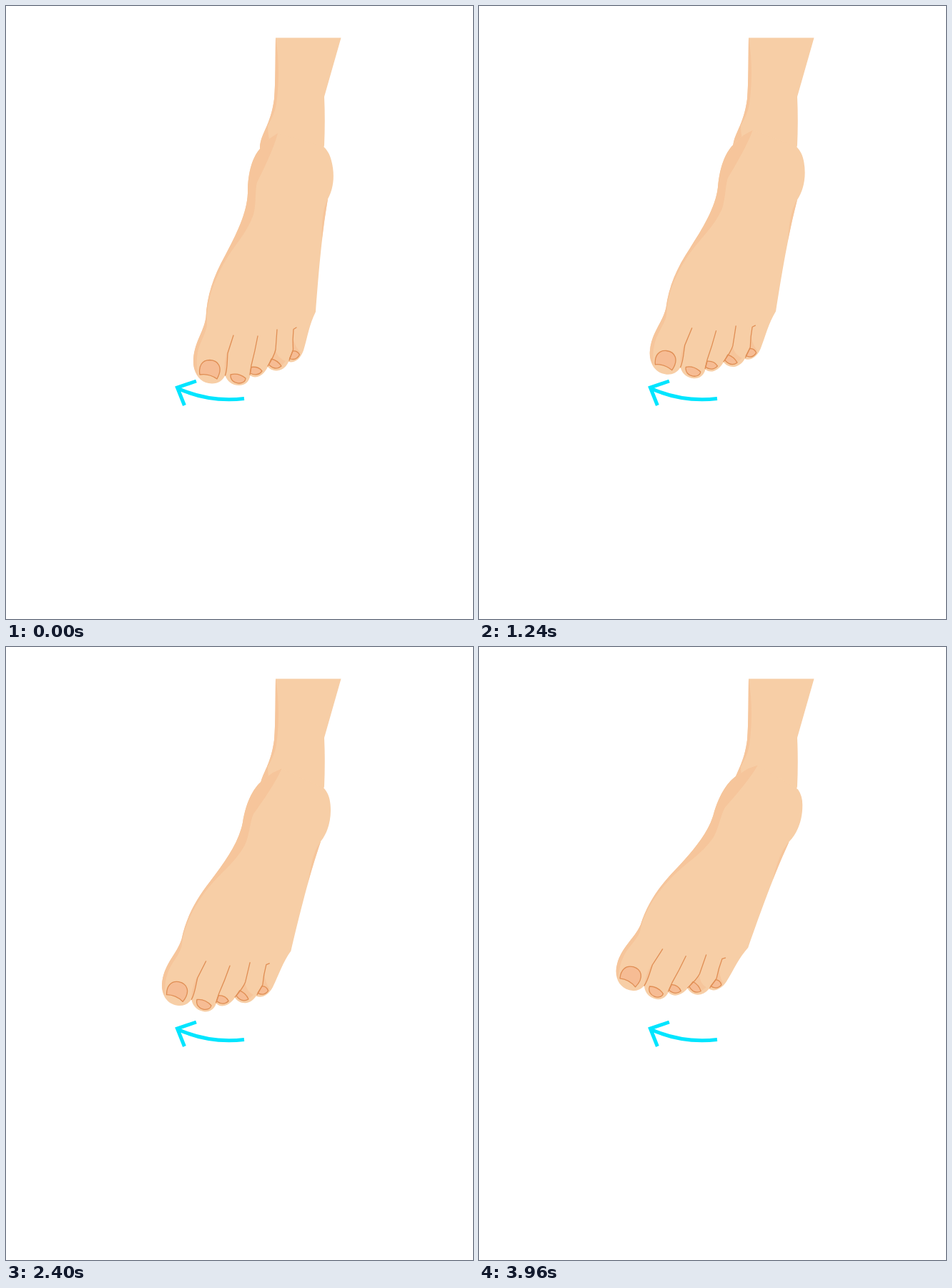
Animation of 653x858 px, one loop 4 s. Source, as an HTML page:

```html
<!DOCTYPE html>
<html lang="en">
<head>
<meta charset="utf-8">
<title>Foot rotation</title>
<style>
  html, body { margin: 0; width: 100%; height: 100%; overflow: hidden; background: #fff; }
  svg { display: block; width: 100%; height: 100%; }
  .skin { fill: #f7cea6; }
  .shade { fill: #f6c59b; }
  .line { fill: none; stroke: #e08e54; stroke-width: 1.3; stroke-linecap: round; stroke-linejoin: round; }
  .nail { fill: #f6bc94; stroke: #e08e54; stroke-width: 1.3; stroke-linejoin: round; }
  .arrow { fill: none; stroke: #00e5ff; stroke-width: 5; }
</style>
</head>
<body>
<svg viewBox="0 0 653 858">
  <g id="leg">
    <path class="skin" d="M377 44.5H468.5L445 127Q446.5 160 445 195L440 215H355V198C356 178 370 168 375 130C377 105 376.5 75 377 44.5Z"/>
    <path class="shade" d="M377 44.5C381 65 383 105 378 137C376 150 370 160 366 168Q366 177 368 187L360 205H355V198C356 178 370 168 375 130C377 105 376.5 75 377 44.5Z"/>
  </g>
  <g id="foot">
    <path class="skin" d="M355 200L368 186L380 178L443 196C449 201 453 208 455 216.5C460 235 458.5 255 450 270C440 330 436 390 433 428C424 446 422 462 416 482C411 496 402 500 395 498C389 512 374 514 366 505C359 520 347 522 341.5 517C340 526 334 531 326 531C316 531 309 525 306.5 517C303 524 297 528.5 288 528.5C272 528.5 262 515 262 498C262 472 276 458 279.5 436C281 405 290 379 306 350C322 320 337 290 338 262C338 228 347 209 355 200Z"/>
    <path class="shade" d="M380 178C374 200 362 225 351 247C348 258 350 278 346 292C337 318 318 336 304 361C290 387 283 408 281 432L281 447C279 460 270 472 268 485Q265 500 269 518C264 512 262 505 262 498C262 472 276 458 279.5 436C281 405 290 379 306 350C322 320 337 290 338 262C338 228 347 209 355 200L368 186Z"/>
    <path class="shade" d="M454 262L450 270Q445 298 441.500 328Q441 300 445 283Q448 272 454 262Z"/>
    <path class="shade" d="M318 461L310 486Q309 505 306.500 517Q304 504 308 488Z"/>
    <path class="shade" d="M377 482Q380 493 391 497L385 504L371 494Z"/>
    <path class="shade" d="M401.500 465Q404 477 412 485L410 488L401 483Z"/>
    <path class="nail" d="M271 516C269 504 274 495.500 285 495.500C297 496 304 506 295 522Q284 514 271 516Z"/>
    <path class="nail" d="M314 516Q325 513 335 521C335 531 313 531 314 516Z"/>
    <path class="nail" d="M343 505.500Q353 504 358 511Q352 519 341.500 514Z"/>
    <path class="nail" d="M371 494Q380 496 385 504Q377 511 367.500 502Z"/>
    <path class="nail" d="M401 483Q407 482 410.500 488Q406 497 396.500 493.500Z"/>
    <path class="line" d="M318 461L310 486C309 497 310 507 306.500 517"/>
    <path class="line" d="M352 462Q348 484 343 503L341 516"/>
    <path class="line" d="M379 453L377 481Q375 490 366 504"/>
    <path class="line" d="M406 450L402 452.500Q400.500 467 401.500 481L396 496"/>
  </g>
  <path class="arrow" d="M333 549.500Q283 555 240 535M266 525L239.500 534L249.500 559"/>
</svg>
<script>
  const LOOP = 4000, STEP = 40, SWING = 15;
  const foot = document.getElementById('foot');
  const lastStep = LOOP / STEP - 1;

  function draw(time) {
    const step = Math.floor((time % LOOP) / STEP);
    foot.setAttribute('transform', `rotate(${SWING * step / lastStep} 432 209)`);
  }

  const start = performance.now();
  function tick() {
    draw(performance.now() - start);
    requestAnimationFrame(tick);
  }
  tick();
</script>
</body>
</html>
```
